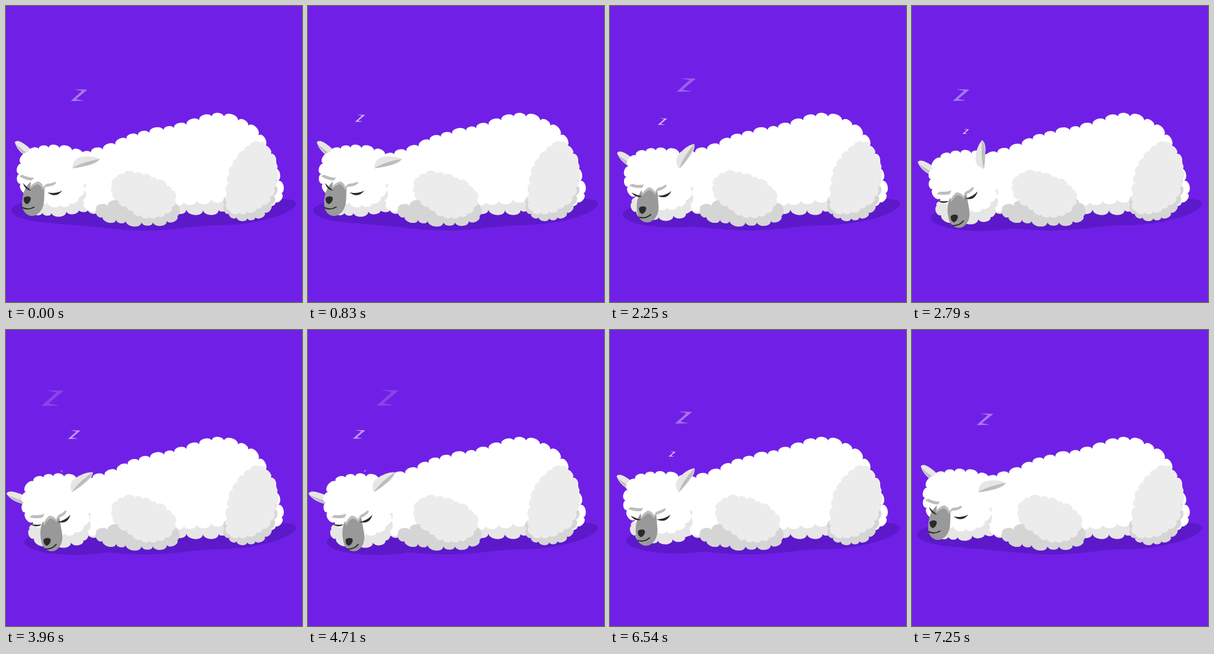
Animation, 505 px wide and 505 px high, one loop 7290 ms. Source, as an HTML page:

```html
<!DOCTYPE html>
<html lang="en">
<head>
<meta charset="utf-8">
<title>Sleeping alpaca</title>
<style>
html, body { margin: 0; width: 100%; height: 100%; overflow: hidden; background: #7020e6; }
svg { display: block; width: 100vw; height: 100vh; }
</style>
</head>
<body>
<svg id="stage" viewBox="0 0 505 505"></svg>
<script>
const LOOP = 7290, LAST = 7250;
const WHITE = '#fff', PALE = '#ececec', SOFT = '#e6e6e6', MID = '#d5d5d5';
const INNER = '#bdbdbd', INK = '#2a2a2a', SHADE = '#5c19c9';
const stage = document.getElementById('stage');

function add(tag, attrs, parent = stage) {
  const el = document.createElementNS('http://www.w3.org/2000/svg', tag);
  for (const k in attrs) el.setAttribute(k, attrs[k]);
  parent.appendChild(el);
  return el;
}
const shape = (fill, d = '', parent = stage) => add('path', { fill, d }, parent);
const move = (el, x, y, angle = 0, size = 1) =>
  el.setAttribute('transform', `translate(${x} ${y}) rotate(${angle}) scale(${size})`);

let seed = 7;
const random = () => (seed = seed * 16807 % 2147483647) / 2147483647;

// Smooth closed curve through clockwise key points, cut into n uneven steps.
function ring(keys, n) {
  const pts = keys.split(' ').map(p => p.split(',').map(Number));
  const at = i => pts[(i + pts.length) % pts.length];
  const curve = [];
  let length = 0;
  for (let i = 0; i < pts.length; i++) {
    for (let u = 0; u < 1; u += 1 / 32) {
      const [x, y] = [0, 1].map(k => {
        const a = at(i - 1)[k], b = at(i)[k], c = at(i + 1)[k], d = at(i + 2)[k];
        return b + u * (c - a + u * (2 * a - 5 * b + 4 * c - d + u * (3 * (b - c) + d - a))) / 2;
      });
      const last = curve[curve.length - 1];
      if (last) length += Math.hypot(x - last.x, y - last.y);
      curve.push({ x, y, length });
    }
  }
  return Array.from({ length: n }, (_, i) => {
    const goal = (i + random() * 0.3) / n * length;
    const { x, y } = curve.find(p => p.length >= goal);
    return [x, y];
  });
}

// Woolly outline: one outward tuft between each pair of neighbours.
function wool(pts) {
  let d = 'M' + pts[0];
  pts.forEach(([x, y], i) => {
    const [qx, qy] = pts[(i + 1) % pts.length];
    const dx = qx - x, dy = qy - y;
    const knob = (along, out) => [x + dx * along + dy * out, y + dy * along - dx * out];
    d += `C${knob(0, .42)} ${knob(.9, .4)} ${[qx, qy]}`;
  });
  return d + 'Z';
}
const fleece = (fill, keys, n, parent) => shape(fill, wool(ring(keys, n)), parent);

// Body, back to front
shape(SHADE, 'M495,338C492,352 440,372 370,374C330,373 290,383 235,383C185,383 140,374 90,372V340L470,329Q495,329 495,338Z');
const headShade = add('ellipse', { fill: SHADE, rx: 86, ry: 22 });
fleece(SOFT, '125,300 372,300 374,345 290,347 140,348', 25);
const back = shape(WHITE);
const backPts = ring('122,264 178,242 214,224 302,205 356,188 404,199 436,228 461,288 463,334 372,328 240,340 130,340', 40);
fleece(MID, '420,300 457,292 452,338 430,359 395,361 373,345 385,315', 15);
fleece(PALE, '428,233 456,260 459,295 446,331 412,350 380,347 380,318 388,272', 21);
fleece(MID, '152,348 186,339 240,330 288,338 288,363 235,369 168,361', 14);
const fore = add('g', {});
fleece(PALE, '184,322 187,295 216,286 262,300 288,325 272,353 235,358 205,340', 19, fore);

// Head parts: pivot, shift and tilt from the sideways pose to the lowered one
const head = add('g', {});
const parts = [];
function part(cx, cy, dx, dy, tilt = 0) {
  const turner = add('g', {}, head);
  parts.push({ turner, cx, cy, dx, dy, tilt });
  return add('g', { transform: `translate(${-cx} ${-cy})` }, turner);
}

const earL = add('g', {}, head);
shape(SOFT, 'M-25,-20Q-20,-25 -8,-16Q4,-8 8,2L-4,6Q-22,-6 -25,-20Z', earL);
shape(INNER, 'M-24,-17Q-18,-6 -4,6L0,2Q-12,-6 -24,-17Z', earL);

fleece(SOFT, '124,293 130,325 126,346 95,351 58,352 32,328', 13, part(80, 320, 8, 12));
fleece(WHITE, '34,253 60,243 100,244 136,259 132,300 119,331 84,338 36,318 23,295 26,268', 18, part(78, 290, 8, 8));
shape('#999', 'M42,300C30,310 26,328 28,344C31,354 38,359 47,358C58,355 64,345 65,332L66,301Z', part(47, 331, 31, 19, -12));

const locks = 'M22,290Q34,298 47,298Q40,304 41,312Q47,306 54,304Q60,306 63,314Q66,309 70,308Q80,308 86,302L70,290L40,284Z';
const hair = part(54, 302, 20, 18, -20);
shape(INNER, locks, hair);
add('path', { d: locks, fill: WHITE, transform: 'translate(1 -5)' }, hair);

shape(INK, 'M30,328C33,324 40,324 42,327C43,331 40,336 36,338C31,337 30,332 30,328Z', part(36, 331, 34, 30));
add('path', { d: 'M28,344Q38,349 48,343', fill: 'none', stroke: INK, 'stroke-width': 2, 'stroke-linecap': 'round' },
  part(38, 345, 39, 26, -20));
shape(INK, 'M29,302Q32,314 43,315Q36,310 29,302Z', part(36, 309, 16, 23, -42));
shape(INK, 'M71,318Q85,329 96,315Q84,321 71,318Z', part(83, 318, 16, 5, -22));

const earR = add('g', {}, head);
shape(SOFT, 'M0,0Q1,-15 14,-18Q33,-22 47,-15Q44,-8 32,-5Z', earR);
shape(INNER, 'M0,1Q14,-9 47,-15Q38,-4 0,1Z', earR);

// Letters rise in turn; each drifts to its own side.
const RISE = 0.084, LIFE = 1640, FIRST = 240, GAP = 744;
const zeds = [...'LRLLRLRRR'].map((side, i) => ({
  birth: FIRST + GAP * i,
  startX: side === 'R' ? 97 : 95,
  drift: side === 'R' ? 0.0255 : -0.011,
  el: shape(WHITE, 'M-7,-10L15,-8L-5,6.5L8,10L-14,9L6,-6.5Z')
}));

function drawZed({ birth, startX, drift, el }, t) {
  const age = (t - birth + LAST) % LAST;
  el.setAttribute('opacity', age < LIFE ? 1 - age / 1780 : 0);
  move(el, startX + drift * age, 241 - RISE * age, -4, (4 + age * 0.0242) / 29);
}

// Eased 0 to 1 between two times, and a short there-and-back twitch.
function ramp(t, from, to) {
  const u = Math.max(0, Math.min(1, (t - from) / (to - from)));
  return u * u * (3 - 2 * u);
}
const flick = (t, from) => ramp(t, from, from + 200) - ramp(t, from + 200, from + 450);

function draw(t) {
  const nod = ramp(t, 1750, 2700);
  const turn = nod - ramp(t, 6050, 7050);
  const shade = nod - ramp(t, 6300, 7150);
  const settle = nod - ramp(t, 3000, 3500);
  const droop = ramp(t, 3000, 3500) - ramp(t, 6050, 6500);

  move(headShade, 95 + 23 * shade, 349 + 13 * shade);

  // Breathing moves only the front of the back.
  const breath = (1 - Math.cos(t / LAST * 6 * Math.PI)) / 2;
  back.setAttribute('d', wool(backPts.map(([x, y]) => {
    const w = y < 264 ? Math.max(0, Math.min(1, (302 - x) / 110)) * breath : 0;
    return [x + 3 * w, y + 4 * w];
  })));
  move(fore, -9 * settle, -1.5 * settle);

  move(head, 2 * settle, settle);
  for (const { turner, cx, cy, dx, dy, tilt } of parts)
    move(turner, cx + dx * turn, cy + dy * turn, tilt * turn);
  move(earL, 40 - 5 * turn - 4 * droop, 252 + 30 * turn + 8 * droop, -7 * turn - 12 * droop - 12 * flick(t, 850));
  move(earR, 113 + 7 * turn - 8 * droop, 276 + turn - droop, -75 * turn + 50 * droop - 8 * flick(t, 4700));

  for (const z of zeds) drawZed(z, t);
}

const start = performance.now();
function tick() {
  draw(Math.min((performance.now() - start) % LOOP, LAST));
  requestAnimationFrame(tick);
}
tick();
</script>
</body>
</html>
```
